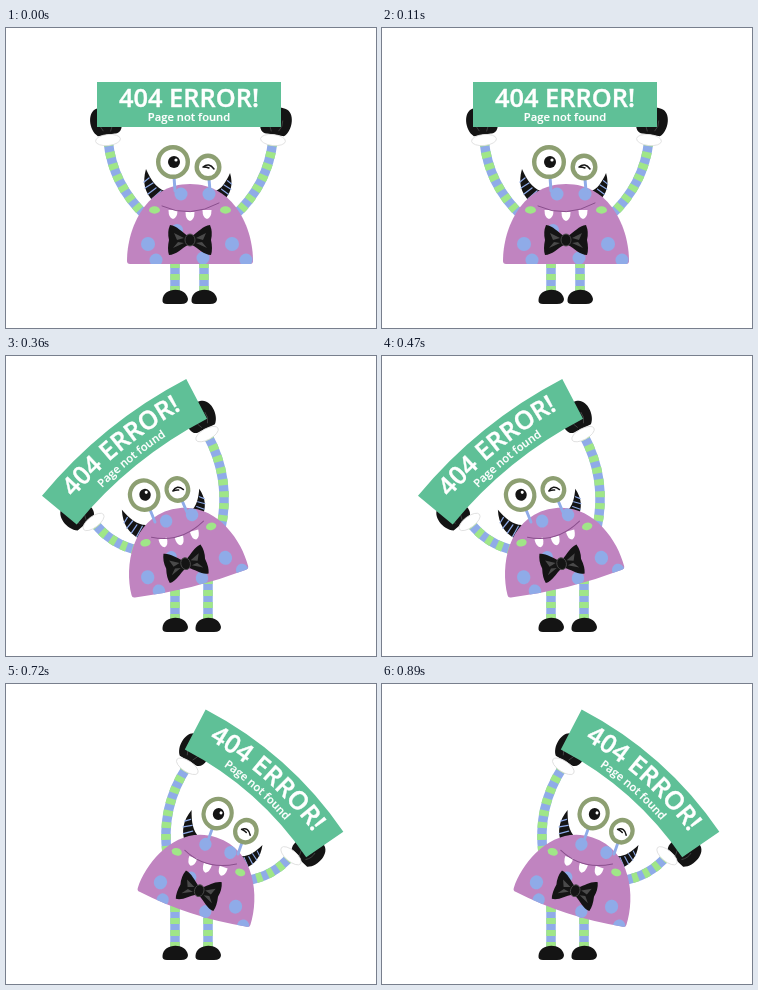
Recreate the animation shown at these times as an HTML page. Size 370 by 300 pixels, loop 1 s.

```html
<!DOCTYPE html>
<html lang="en">
<head>
<meta charset="utf-8">
<title>404</title>
<style>
  html, body { margin: 0; width: 100%; height: 100%; overflow: hidden; background: #fff; }
  svg { display: block; width: 100%; height: 100%; }
  text { font-family: "Open Sans", "Noto Sans", sans-serif; font-weight: 600; fill: #fff;
         stroke: #fff; stroke-linejoin: round; text-anchor: middle; }
</style>
</head>
<body>
<svg id="stage" viewBox="0 0 370 300" xmlns="http://www.w3.org/2000/svg"></svg>
<script>
const C = { banner: '#5fc097', body: '#c084c0', blue: '#8fabe8', green: '#a0e688',
            olive: '#8d9f72', ink: '#141414', fold: '#4a4a4a', line: '#8a4f8d' };
const LOOP = 1000, STEP = 180;
const MID = 184, FLOOR = 236;
const SIGN = { width: 184, height: 45 };

// lean turns the face, tilt the whole body; x, y, turn and curl place the sign
const POSES = [
  { lean: 0, tilt: 0, x: 183, y: 76.5, turn: 0, curl: 0 },
  { lean: -6, tilt: 0, x: 153, y: 88, turn: -21.5, curl: 9 },
  { lean: -14, tilt: -14, x: 122, y: 98.5, turn: -39, curl: 11.5 },
  { lean: 7, tilt: 0, x: 220, y: 85, turn: 19, curl: 0 },
  { lean: 18, tilt: 18, x: 254, y: 103, turn: 41.6, curl: 14 }
];

const rad = deg => deg * Math.PI / 180;
const add = (a, b) => [a[0] + b[0], a[1] + b[1]];
const mix = (a, b, t) => [a[0] + (b[0] - a[0]) * t, a[1] + (b[1] - a[1]) * t];
const spin = ([x, y], deg) => {
  const c = Math.cos(rad(deg)), s = Math.sin(rad(deg));
  return [x * c - y * s, x * s + y * c];
};

const path = (d, attrs) => `<path d="${d}" ${attrs}/>`;
const fill = color => `fill="${color}"`;
const pen = (color, width) => `fill="none" stroke="${color}" stroke-width="${width}" stroke-linecap="round"`;
const group = (transform, inner) => `<g transform="${transform}">${inner}</g>`;
const oval = (x, y, rx, ry, attrs) => `<ellipse cx="${x}" cy="${y}" rx="${rx}" ry="${ry}" ${attrs}/>`;
const both = draw => [-1, 1].map(draw).join('');

// The monster stands on a base point and squashes a little as it tilts.
const base = p => [MID + Math.abs(p.tilt) * .1, FLOOR - Math.abs(p.tilt) * .36];
const squash = p => 1 - Math.abs(p.tilt) / 300;
const stand = (p, deg, inner) => group(
  `translate(${base(p)}) rotate(${deg}) scale(${squash(p)} 1) translate(${-MID} ${-FLOOR})`, inner);

function striped(d) {
  return path(d, `fill="none" stroke="${C.blue}" stroke-width="9.5"`) +
         path(d, `fill="none" stroke="${C.green}" stroke-width="9.5" stroke-dasharray="6"`);
}

function legs(p) {
  const right = 198 + Math.min(4, Math.abs(p.lean));
  const shoe = 'M-12.5 8C-12-5 11-6 13 7Q13 12 6 12H-8Q-13 12-12.5 8Z';
  return [169, right].map(x => striped(`M${x} 210V264`) +
    group(`translate(${x} 264)`, path(shoe, fill(C.ink)))).join('');
}

// One end of the sign at height v, from top 0 to bottom 1.
function edge(p, side, v) {
  const half = SIGN.width / 2 * Math.cos(rad(p.curl)) ** 2;
  return add(add([p.x, p.y], spin([side * half, 0], p.turn)),
             spin([0, (v - .5) * SIGN.height], p.turn + side * p.curl));
}

function signLine(p, v, back) {
  const a = edge(p, back ? 1 : -1, v), b = edge(p, back ? -1 : 1, v);
  const rise = Math.hypot(b[0] - a[0], b[1] - a[1]) / 2 * Math.tan(rad(p.curl));
  return `${a}Q${add(mix(a, b, .5), spin([0, -rise], p.turn))} ${b}`;
}

function sign(p) {
  const words = (id, v, size, label) =>
    path('M' + signLine(p, v), `id="${id}" fill="none"`) +
    `<text font-size="${size}" stroke-width="${size / 60}">` +
    `<textPath href="#${id}" startOffset="50%">${label}</textPath></text>`;
  return path(`M${signLine(p, 0)}L${signLine(p, 1, true)}Z`, fill(C.banner)) +
    words('big', .55, 25.4, '404 ERROR!') + words('small', .87, 11.2, 'Page not found');
}

// Hands hold the lower corners; each arm bows outwards to its shoulder.
function limb(p, side) {
  const corner = edge(p, side, 1), grip = (p.turn + side * p.curl) * 1.15;
  const palm = add(corner, spin([side < 0 ? 9 : -5, -5], grip));
  const cuff = add(corner, spin([side < 0 ? 11 : -8, 13], grip));
  const shoulder = add(base(p), spin([side * 44 * squash(p), -48], p.lean));
  const [dx, dy] = [shoulder[0] - cuff[0], shoulder[1] - cuff[1]];
  const bend = add(mix(cuff, shoulder, .5), [side * dy * .19, -side * dx * .19]);
  const wrist = Math.atan2(bend[1] - cuff[1], bend[0] - cuff[0]) * 180 / Math.PI - 90;
  return { side, palm, cuff, shoulder, bend, wrist };
}

const arm = a => striped(`M${a.cuff}Q${a.bend} ${a.shoulder}`);

function hand(a) {
  const mitten = path('M-10 14C-19 7-19-13-8-15C4-18 15-10 16 2C17 9 13 14 8 13Z', fill(C.ink)) +
    path('M-4 9Q-8 4-7-2M4 10Q7 5 6 0', pen(C.fold, .8));
  return group(`translate(${a.palm}) rotate(${a.wrist}) scale(${-a.side * .95} .95)`, mitten) +
    group(`translate(${a.cuff}) rotate(${a.wrist})`,
      oval(0, 0, 12.5, 5.5, 'fill="#fff" stroke="#ddd" stroke-width=".8"'));
}

function horns() {
  return both(side => group(`translate(${side < 0 ? 153 : 213} 168) scale(${side < 0 ? 1 : -.85} ${side < 0 ? 1 : .85})`,
    path('M-13-27C-17-13-14-3-5 6L6-5C-3-8-8-16-13-27Z', fill(C.ink)) +
    path('M-15-14L-10-18M-14-8L-6-13M-11-2L-3-8M-7 3L2-5', pen(C.blue, 1.3))));
}

function eyes() {
  const eye = (x, y, r, inside) => path(`M${x} ${y}L${x + 2} 163`, pen(C.blue, 3)) +
    group(`translate(${x} ${y})`,
      `<circle r="${r - 2.2}" fill="#fff" stroke="${C.olive}" stroke-width="4.4"/>` + inside);
  return eye(167, 134, 17, oval(1, 0, 6, 6, fill(C.ink)) + oval(3, -2, 1.6, 1.6, fill('#fff'))) +
    eye(202, 139, 13.5, path('M-5 0Q1-5 6 2M-5 0Q-1 0 1 1', pen(C.ink, 1.5)));
}

function dots() {
  const pairs = both(side => oval(MID + side * 42, 216, 7, 7, fill(C.blue)) +
    oval(MID + 11 + side * 45, 232, 6.5, 6.5, fill(C.blue)) +
    oval(MID + 5 + side * 14, 166, 6.5, 6.5, fill(C.blue)));
  return pairs + oval(197, 230, 6.5, 6.5, fill(C.blue)) + oval(171, 202, 6, 6, fill(C.blue));
}

function body(p) {
  const sag = Math.abs(p.tilt) * .25, low = FLOOR - sag;
  const dome = `M121 ${low - 3}Q121 ${low} 124 ${low}Q${MID} ${FLOOR + sag} 244 ${low}Q247 ${low} 247 ${low - 3}` +
    `C247 200 228 156 ${MID} 156C140 156 121 200 121 ${low - 3}Z`;
  return `<clipPath id="dome">${path(dome, '')}</clipPath>` + path(dome, fill(C.body)) +
    `<g clip-path="url(#dome)">${group(`rotate(${p.lean - p.tilt} ${MID} ${FLOOR})`, dots())}</g>`;
}

function face() {
  const teeth = [-1, 0, 1].map(i => group(`translate(${MID + i * 17} ${184 - 2 * Math.abs(i)})`,
    path('M-4.5 0H4.5Q4.5 8 0 9Q-4.5 8-4.5 0Z', fill('#fff')))).join('');
  const spots = both(side => oval(MID + side * 35.5, 182, 5.5, 3.7, fill(C.green)));
  const bow = both(side => group(`translate(${MID} 212) scale(${side} 1)`,
    path('M2-4C8-8 13-14 20-15Q23-8 21 0Q23 9 21 15C14 15 8 8 2 5Z', fill(C.ink)) +
    path('M6-2L16-7L13 0ZM6 3L17 8L12 2Z', fill(C.fold)))) +
    oval(MID, 212, 5, 6, `fill="${C.ink}" stroke="${C.fold}" stroke-width=".9"`);
  return spots + teeth + path('M156 178Q184 191 213 175', pen(C.line, 1)) + bow;
}

function draw(p) {
  const limbs = [limb(p, -1), limb(p, 1)], nod = p.lean * 1.3;
  return legs(p) + limbs.map(arm).join('') + stand(p, nod, horns()) +
    stand(p, p.tilt, body(p)) + stand(p, p.lean, face()) + stand(p, nod, eyes()) +
    limbs.map(hand).join('') + sign(p);
}

const stage = document.getElementById('stage');
const start = performance.now();
let shown;

function tick(now) {
  const t = Math.max(0, now - start) % LOOP;
  const pose = POSES[Math.min(POSES.length - 1, Math.floor(t / STEP))];
  if (pose !== shown) {
    stage.innerHTML = draw(pose);
    shown = pose;
  }
  requestAnimationFrame(tick);
}
tick(start);
</script>
</body>
</html>
```
